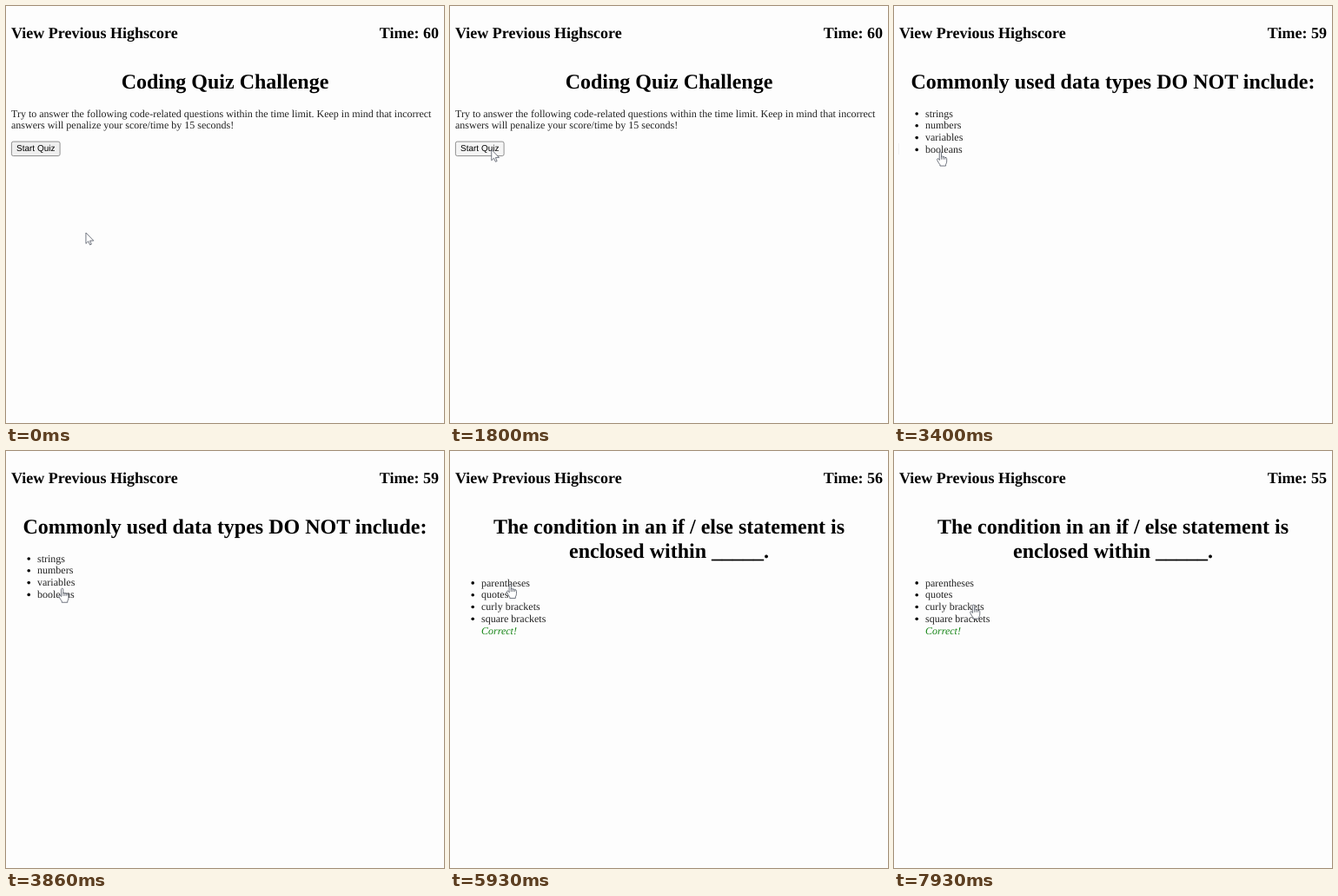
An HTML page that plays this animation: 504 px wide and 480 px high, repeating every 8 s.

```html
<!DOCTYPE html>
<html lang="en">
<head>
<meta charset="utf-8">
<title>Coding Quiz Challenge</title>
<style>
  html, body { margin: 0; width: 100%; height: 100%; overflow: hidden; background: #fdfdfd; }
  svg { display: block; width: 504px; height: 480px; }
  text { font: 12px "Liberation Serif", "Times New Roman", serif; fill: #222; text-rendering: geometricPrecision; white-space: pre; }
  .h1 { font-size: 24px; font-weight: bold; text-anchor: middle; fill: #000; }
  .h2 { font-size: 18px; font-weight: bold; fill: #000; }
  .end { text-anchor: end; }
  .label { font: 10px "Liberation Sans", Arial, sans-serif; fill: #000; }
  .verdict { font-style: italic; fill: #148414; }
  #arrow path, #hand path { fill: #fff; stroke: #545a66; stroke-width: 1.1; stroke-linejoin: round; stroke-linecap: round; }
  #hand path + path { fill: none; }
</style>
</head>
<body>
<svg viewBox="0 0 504 480">
  <text class="h2" x="6" y="37">View Previous Highscore</text>
  <text class="h2 end" id="timer" x="498" y="37"></text>
  <g id="intro">
    <rect id="button" x="6.4" y="156.1" width="55.7" height="16.4" rx="2" stroke="#767676" stroke-width=".8"/>
    <text class="label" x="12" y="167.4">Start Quiz</text>
  </g>
  <g id="first"></g>
  <g id="second"></g>
  <g id="arrow"><path d="M.6 .6V16.6L4.3 13.1 6.8 18.6 9.1 17.6 6.8 12.2H11.9Z"/></g>
  <g id="hand">
    <path d="M-1.5 12V1.4Q-1.4 0 0 0T1.5 1.4V7Q3.2 5.9 4.2 7.6 6 6.7 6.9 8.5 9.5 7.7 9.7 10.4V14.5Q9.7 17 8.2 19.3V21.4H-.6V19.6Q-3.4 16.2-4.9 12.6-5.5 10.4-3.7 10.1-2.5 10.2-1.5 12Z"/>
    <path d="M1.5 7V11M4.2 7.6V11M6.9 8.5V11"/>
  </g>
</svg>
<script>
  const LOOP = 8000, STEP = 1000 / 15, SCALE = 0.75;
  const LINE = 13.8, TITLE_LINE = 27.9, TEXT_TOP = 127.6;
  const PRESS = 27, START = 29, ANSWER = 69;
  const TICKS = [44, 59, 74, 89, 105];

  // Pointer hot spot: step, x, y
  const PATH = [
    [0, 91.5, 261], [7, 66, 202.5], [13, 66, 202.5], [24, 47.3, 165.3],
    [48, 47.3, 165.3], [51, 53.4, 168], [61, 69.5, 154], [66, 69.2, 153.4],
    [91, 69.2, 153.4], [97, 110, 150], [98, 110, 150], [104, 499.3, 59.8],
    [105, 502, 62], [108, 170, 172], [111, 170, 172], [119, 91.5, 177], [120, 91.5, 177]
  ];

  const $ = id => document.getElementById(id);

  function add(parent, tag, attrs, content = "") {
    const node = document.createElementNS("http://www.w3.org/2000/svg", tag);
    for (const name in attrs) node.setAttribute(name, attrs[name]);
    node.textContent = content;
    parent.append(node);
  }

  function heading(group, lines) {
    lines.forEach((line, i) => add(group, "text", { class: "h1", x: 252, y: 94.7 + i * TITLE_LINE }, line));
  }

  function question(group, title, answers, verdict) {
    heading(group, title);
    const top = TEXT_TOP + (title.length - 1) * TITLE_LINE;
    answers.forEach((answer, i) => {
      const y = top + i * LINE;
      add(group, "circle", { cx: 26.2, cy: y - 3.6, r: 1.8 });
      add(group, "text", { x: 36, y }, answer);
    });
    if (verdict) add(group, "text", { class: "verdict", x: 36, y: top + answers.length * LINE }, verdict);
  }

  heading($("intro"), ["Coding Quiz Challenge"]);
  [
    "Try to answer the following code-related questions within the time limit. Keep in mind that incorrect",
    "answers will penalize your score/time by 15 seconds!"
  ].forEach((line, i) => add($("intro"), "text", { x: 6, y: TEXT_TOP + i * LINE }, line));

  question($("first"), ["Commonly used data types DO NOT include:"],
    ["strings", "numbers", "variables", "booleans"]);
  question($("second"), ["The condition in an if / else statement is", "enclosed within _____."],
    ["parentheses", "quotes", "curly brackets", "square brackets"], "Correct!");

  function pointerAt(step) {
    const i = Math.max(1, PATH.findIndex(p => p[0] >= step));
    const [s0, x0, y0] = PATH[i - 1], [s1, x1, y1] = PATH[i];
    const u = (step - s0) / (s1 - s0);
    return [x0 + (x1 - x0) * u, y0 + (y1 - y0) * u];
  }

  const show = (id, visible) => { $(id).style.display = visible ? "" : "none"; };

  function draw(ms) {
    const step = Math.min(119, Math.floor((ms + 6.7) / STEP));
    const [x, y] = pointerAt(step);
    const listTop = step < ANSWER ? 117 : 145;
    const overList = step > START && x > 36 && x < 498 && y > listTop && y < listTop + 4 * LINE;
    const overButton = x > 6 && x < 62.5 && y > 156 && y < 173;

    show("intro", step < START);
    show("first", step >= START && step < ANSWER);
    show("second", step >= ANSWER);
    show("arrow", !overList);
    show("hand", overList);
    $(overList ? "hand" : "arrow").setAttribute("transform", `translate(${x} ${y}) scale(${SCALE})`);
    $("button").setAttribute("fill", step >= PRESS ? "#f5f5f5" : overButton ? "#e5e5e5" : "#efefef");
    $("timer").textContent = "Time: " + (60 - TICKS.filter(t => t <= step).length);
  }

  const began = performance.now();
  function frame() {
    draw((performance.now() - began) % LOOP);
    requestAnimationFrame(frame);
  }
  frame();
</script>
</body>
</html>
```
